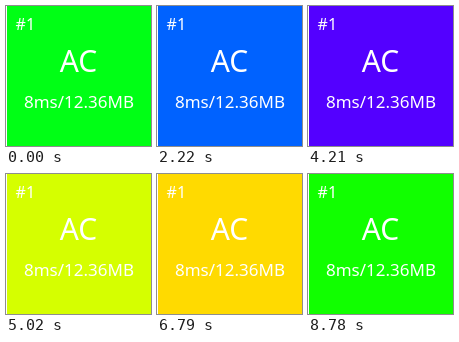
Animation, 145 px wide and 140 px high, one loop 8800 ms. Source, as an HTML page:

```html
<!DOCTYPE html>
<html lang="en">
<head>
<meta charset="utf-8">
<title>Test result</title>
<style>
  html, body { margin: 0; width: 100%; height: 100%; overflow: hidden; background: #fff; }
  svg { display: block; width: 100vw; height: 100vh; }
  text { fill: #fff; font-family: "Noto Sans", "Open Sans", sans-serif; }
</style>
</head>
<body>
<svg viewBox="0 0 145 140">
  <rect id="tile" x="1" width="144" height="140"/>
  <text x="9.6" y="24" font-size="16">#1</text>
  <text x="72.5" y="66" font-size="30" text-anchor="middle">AC</text>
  <text x="73" y="102" font-size="17" text-anchor="middle">8ms/12.36MB</text>
</svg>
<script>
const LOOP = 8800;
const tile = document.getElementById("tile");

// Unwrapped hue in degrees; each stretch advances in equal small steps.
const stretches = [
  { start: 0, hue: 125, steps: 52 },
  { start: 2220, hue: 577, steps: 29 },
  { start: 3460, hue: 828, steps: 34 },
  { start: 5020, hue: 1150, steps: 21 },
  { start: 5980, hue: 1337, steps: 40 },
  { start: 7690, hue: 1680, steps: 28 },
  { start: 8780, hue: 1916, steps: 1 },
  { start: LOOP, hue: 1925 }
];

function hueAt(time) {
  const next = stretches.findIndex(s => s.start > time);
  const from = stretches[next - 1], to = stretches[next];
  const progress = (time - from.start) / (to.start - from.start);
  const stepped = Math.floor(progress * from.steps) / from.steps;
  return (from.hue + (to.hue - from.hue) * stepped) % 360;
}

function render(time) {
  tile.setAttribute("fill", `hsl(${hueAt(time).toFixed(2)}, 100%, 50%)`);
}

let origin;
function tick(now) {
  origin ??= now;
  render((now - origin) % LOOP);
  requestAnimationFrame(tick);
}
render(0);
requestAnimationFrame(tick);
</script>
</body>
</html>
```
